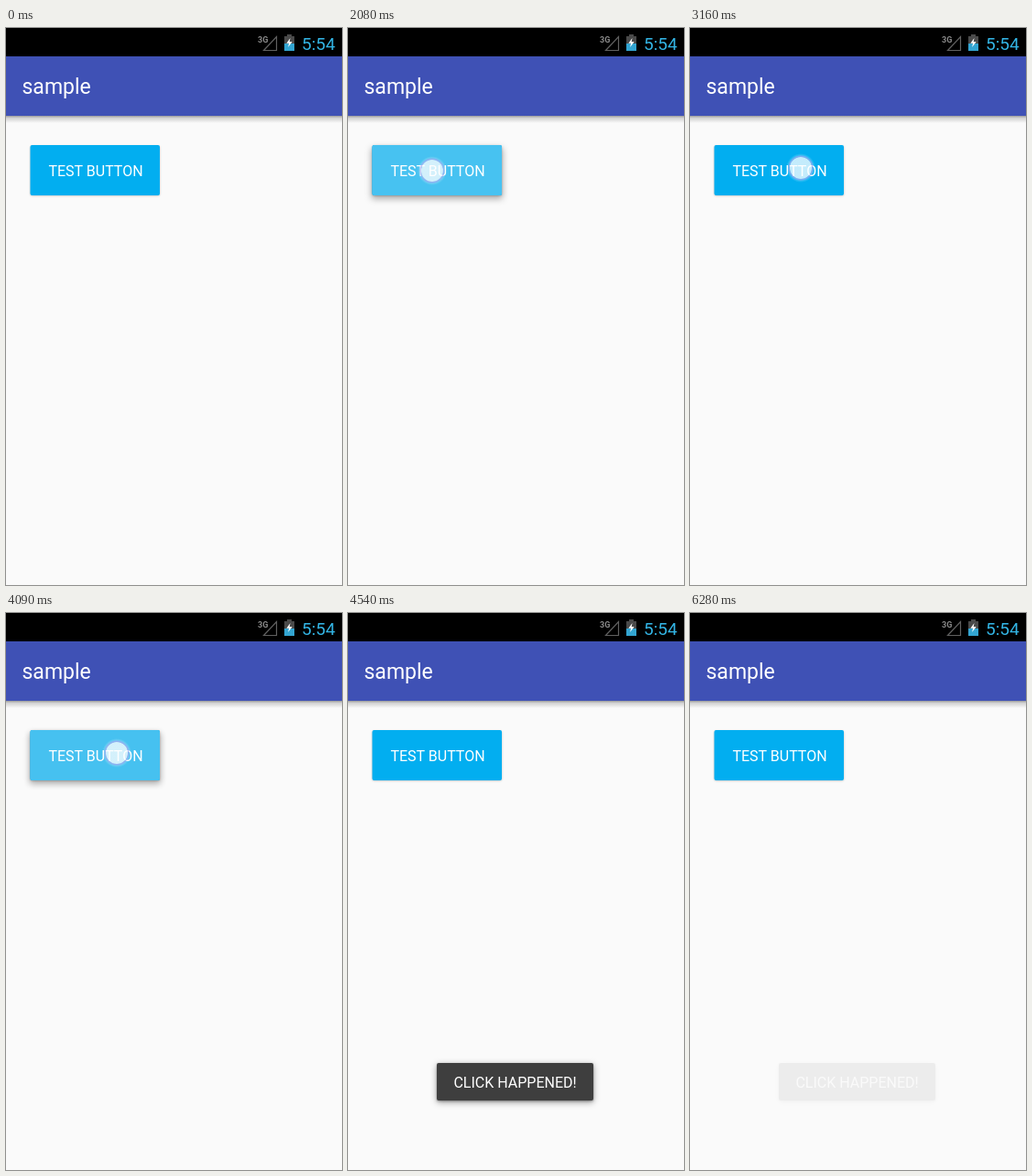
An HTML page for the animation above (6.34 s loop, 367 px wide and 609 px high).

```html
<!DOCTYPE html>
<html lang="en">
<head>
<meta charset="utf-8">
<title>Button press demo</title>
<style>
  html, body { margin: 0; width: 100%; height: 100%; overflow: hidden; background: #fafafa; }
  svg { display: block; width: 367px; height: 609px; }
  text { font-family: Roboto, "Noto Sans", sans-serif; fill: #fff; }
  .label { font-size: 16px; text-anchor: middle; }
  .pressed, .pointer, .toast { animation: 6340ms linear infinite; }
  .pressed { animation-name: press; }
  .pointer { animation-name: move, show; animation-duration: 6340ms, 6340ms; }
  .toast { animation-name: toast; }

  /* Held, dragged away and released, then clicked */
  @keyframes press {
    0%, 14.51% { opacity: 0; animation-timing-function: ease-in-out; }
    21.45%, 37.54% { opacity: 1; animation-timing-function: ease-in-out; }
    42.27%, 59.94% { opacity: 0; animation-timing-function: ease-out; }
    64.83%, 65.46% { opacity: 1; }
    68.77% { opacity: .3; }
    70.19%, 100% { opacity: 0; }
  }
  @keyframes move {
    0%, 32.49% { transform: translate(90.5px, 156px); animation-timing-function: ease-in; }
    36.59% { transform: translate(200.3px, 155px); animation-timing-function: ease-out; }
    39.12%, 46.53% { transform: translate(248px, 155px); animation-timing-function: ease-in-out; }
    49.84%, 100% { transform: translate(121px, 153px); }
  }
  @keyframes show {
    0% { opacity: 0; animation-timing-function: step-end; }
    1.577% { opacity: 1; animation-timing-function: step-end; }
    65.46%, 100% { opacity: 0; }
  }
  @keyframes toast {
    0%, 66.25% { opacity: 0; }
    68.77% { opacity: .61; }
    71.61%, 93.85% { opacity: 1; }
    94.32% { opacity: .96; }
    99.05%, 100% { opacity: .07; }
  }
</style>
</head>
<body>
<svg viewBox="0 0 367 609">
  <defs>
    <linearGradient id="barShade" x2="0" y2="1">
      <stop offset="0" stop-opacity=".38"/>
      <stop offset=".3" stop-opacity=".16"/>
      <stop offset="1" stop-opacity="0"/>
    </linearGradient>
    <radialGradient id="glow">
      <stop offset=".78" stop-color="#fff" stop-opacity=".32"/>
      <stop offset="1" stop-color="#fff" stop-opacity="0"/>
    </radialGradient>
    <filter id="soft" x="-20%" y="-40%" width="140%" height="180%"><feGaussianBlur stdDeviation="1"/></filter>
    <filter id="wide" x="-20%" y="-50%" width="140%" height="200%"><feGaussianBlur stdDeviation="3.5"/></filter>
  </defs>

  <rect width="367" height="609" fill="#fafafa"/>
  <rect y="96" width="367" height="8" fill="url(#barShade)"/>
  <rect y="31" width="367" height="65" fill="#3f51b5"/>
  <rect width="367" height="31"/>
  <text x="17.5" y="72" font-size="23">sample</text>

  <!-- Status icons -->
  <text x="275" y="15.5" font-size="9" font-weight="700" style="fill:#8a8a8a">3G</text>
  <path d="M281.5 24.5H295.5V9.5Z" fill="none" stroke="#606060" stroke-width="1.2"/>
  <path d="M307 7h5v2h3v9h-11v-9h3z" fill="#4a4a4a"/>
  <rect x="304" y="17" width="11" height="8" fill="#33a5d2"/>
  <path d="M310.5 11l-4.2 5.7h2.8l-1 4.3 4.6-6h-3z" fill="#fff"/>
  <text x="323" y="23.5" font-size="19" style="fill:#33b5e5">5:54</text>

  <!-- Button -->
  <rect x="26.5" y="129" width="141.5" height="54.5" rx="2" opacity=".24" filter="url(#soft)"/>
  <rect class="pressed" x="25.5" y="131" width="143.5" height="56" rx="3" fill-opacity=".3" filter="url(#wide)"/>
  <rect x="26.5" y="128" width="141.5" height="55" rx="2" fill="#02aef0"/>
  <rect class="pressed" x="26.5" y="128" width="141.5" height="55" rx="2" fill="#47c2f1"/>
  <text class="label" x="98" y="162">TEST BUTTON</text>

  <g class="toast">
    <rect x="97" y="494" width="171" height="41" rx="2" fill-opacity=".38" filter="url(#wide)"/>
    <rect x="97" y="493" width="171" height="41" rx="2" fill-opacity=".3" filter="url(#soft)"/>
    <rect x="97" y="492" width="171" height="41" rx="2" fill="#3e3e3e"/>
    <text class="label" x="182.5" y="519">CLICK HAPPENED!</text>
  </g>

  <g class="pointer">
    <circle r="16" fill="url(#glow)"/>
    <circle r="12" fill="#fff" fill-opacity=".66"/>
    <circle r="12.8" fill="none" stroke="#9a9aee" stroke-opacity=".6" stroke-width="1.4"/>
  </g>
</svg>
</body>
</html>
```
